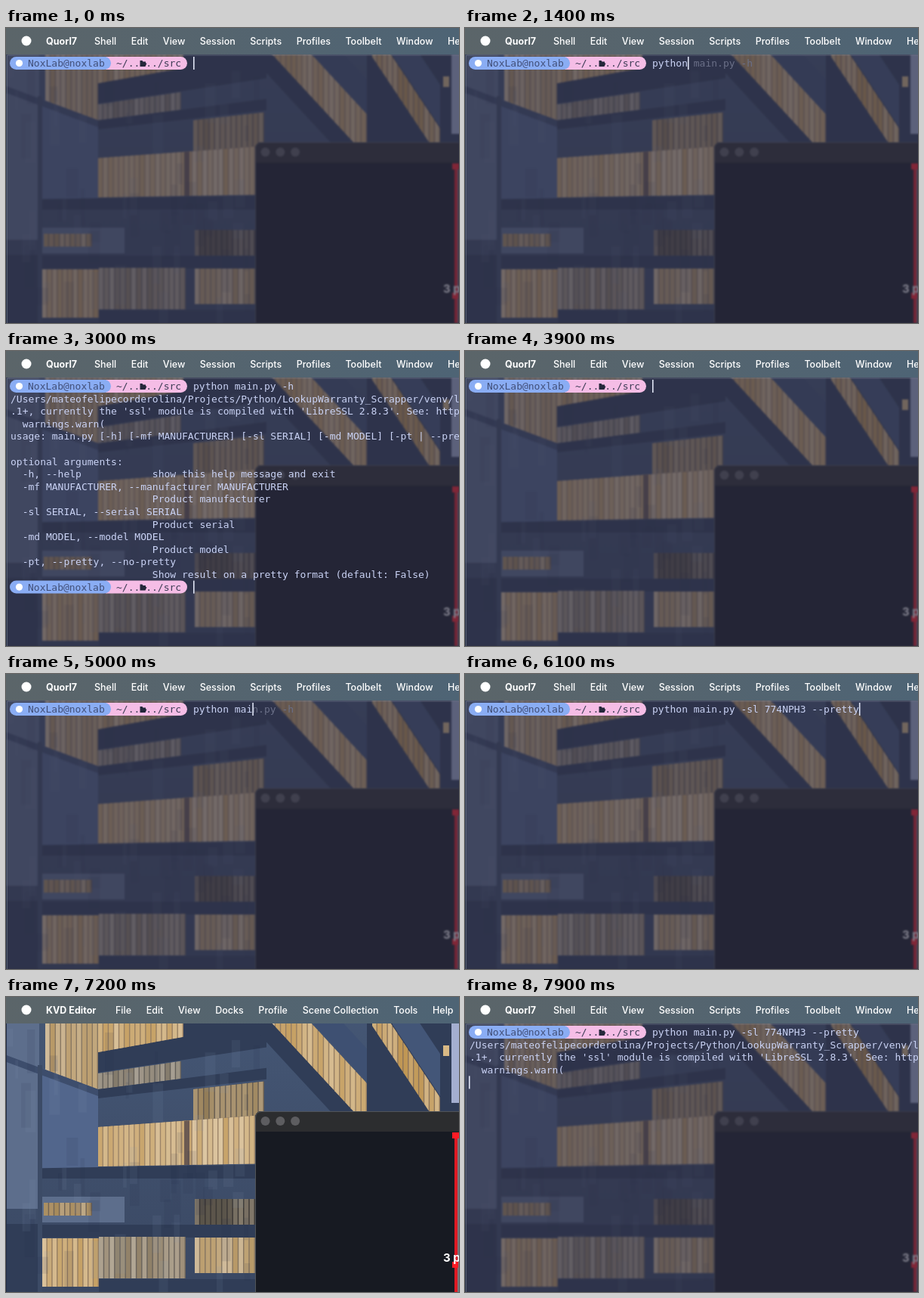
Write an HTML page that moves like this. It is 600 by 390 pixels and loops after 8000 ms.

```html
<!DOCTYPE html>
<html lang="en">
<head>
<meta charset="utf-8">
<title>Terminal session</title>
<style>
  html, body { margin: 0; width: 100%; height: 100%; overflow: hidden; background: #24273a; }
  svg { display: block; width: 100vw; height: 100vh; }
  text { white-space: pre; }
  .mono { font: 13px "DejaVu Sans Mono", monospace; fill: #cad3f5; }
  .menu { font: 500 12.5px Inter, "Open Sans", sans-serif; fill: #fff; }
  .app { font-weight: 700; }
  #painting { filter: blur(0.6px); }
</style>
</head>
<body>
<svg id="stage" viewBox="0 0 600 390" preserveAspectRatio="none">
  <defs>
    <linearGradient id="wall" x2="0" y2="1">
      <stop offset="0" stop-color="#455775"/><stop offset="1" stop-color="#3a4863"/>
    </linearGradient>
    <linearGradient id="bar"><stop offset="0" stop-color="#5b6569"/><stop offset="1" stop-color="#4e6475"/></linearGradient>
    <g id="prompt">
      <path d="M132-13H231.5a8.5 8.5 0 0 1 0 17H132z" fill="#f5bde6"/>
      <rect x="5" y="-13" width="134" height="17" rx="8.5" fill="#8aadf4"/>
      <circle cx="17.5" cy="-4.5" r="4.6" fill="#fff"/>
      <text class="mono" x="29" style="fill:#414f78">NoxLab@noxlab</text>
      <text class="mono" x="146" style="fill:#3d3c55">~/..</text>
      <path d="M177.5 0v-8h3l1 1.5h3.5v2h1.5l-2 4.5z" fill="#24273a"/>
      <text class="mono" x="185.2" style="fill:#3d3c55">../src</text>
    </g>
  </defs>
  <g id="desktop">
    <g id="painting"></g>
    <g id="window">
      <path d="M330 390V160q0-9 9-9H600V390z" fill="#171a22"/>
      <path d="M330 178V160q0-9 9-9H600V178z" fill="#2c2d2f"/>
      <path d="M330.5 390V160q0-8.5 8.5-8.5H600" fill="none" stroke="#505459"/>
      <path d="M599 187V390" stroke="#77737a" stroke-width="2"/>
      <path d="M596 180V390" stroke="#df1a24" stroke-width="4"/>
      <path d="M591 183h9M591 354h8" stroke="#ff1b25" stroke-width="8"/>
      <text x="579" y="350" fill="#fff" style="font:700 15px Inter,sans-serif">3 px</text>
    </g>
  </g>
  <g id="terminal">
    <rect x="1" y="35" width="599" height="355" fill="#2d2e43" opacity=".6"/>
    <path d="M1.5 390V36H600" fill="none" stroke="#7d8596" stroke-opacity=".55"/>
    <use href="#prompt" y="51"/>
    <use id="nextPrompt" href="#prompt"/>
    <g id="lines"></g>
    <text class="mono" x="248" y="51"><tspan id="typed"></tspan><tspan id="ghost" fill="#6b7088"></tspan></text>
    <rect id="cursor" width="1.6" height="17" fill="#dfe4f5"/>
  </g>
  <g id="termMenu"></g>
  <g id="recMenu"></g>
</svg>
<script>
const NS = "http://www.w3.org/2000/svg";
const $ = id => document.getElementById(id);
const LOOP = 8000, CHAR = 7.826, ROW = 16.6, BASE = 51, LEFT = 6, INPUT = 248;

function add(parent, tag, attrs, text = "") {
  const el = document.createElementNS(NS, tag);
  for (const key in attrs) el.setAttribute(key, attrs[key]);
  el.textContent = text;
  return parent.appendChild(el);
}

let seed = 7;
const random = () => (seed = seed * 16807 % 2147483647) / 2147483647;

// Each wing maps a height at its near corner to the height at x.
const HORIZON = 240, CORNER = 122;
const flat = (x, y) => y;
const front = (x, y) => y + Math.min(0, y - HORIZON) * (x - CORNER) * 0.00107;
const sloped = (origin, slope) => (x, y) => y + (x - origin) * slope;
const left = sloped(52, 0.37), right = sloped(350, 1.08), far = sloped(485, 1.5);

function panel(wing, x1, x2, top, bottom, fill, opacity = 1) {
  const points = [[x1, top], [x2, top], [x2, bottom], [x1, bottom]].map(([x, y]) => [x, wing(x, y)]);
  add($("painting"), "polygon", { points: points.join(" "), fill, opacity });
}

// A row of lit panes with uneven brightness and thin mullions.
function glazing(wing, x1, x2, top, bottom, light = 68, saturation = 46) {
  const step = (x2 - x1) / Math.max(2, Math.round((x2 - x1) / 7));
  panel(wing, x1, x2, top, bottom, `hsl(32,${saturation * 0.45}%,${light - 19}%)`);
  for (let x = x1; x < x2 - 1; x += step) {
    const tone = light + 6 - 16 * random();
    panel(wing, x, x + step * 0.8, top, bottom, `hsl(37,${saturation}%,${tone}%)`);
  }
}

function drawBuilding() {
  const shade = "#303d57", pale = "#5d6e8c";
  panel(flat, 0, 600, 0, 390, "url(#wall)");
  // left wing
  panel(flat, 0, 44, 30, 280, pale);
  panel(flat, 48, CORNER, 95, 236, "#52668c");
  glazing(left, 52, CORNER, 0, 96, 65, 36);
  panel(left, 0, CORNER, 96, 105, "#3d4d6c");
  panel(flat, 42, 48, 90, 390, "#3c4b66");
  panel(flat, 48, 157, 264, 298, pale);
  glazing(flat, 50, 114, 272, 289, 58, 30);
  panel(flat, 0, 42, 300, 390, shade);
  // front wing
  panel(front, CORNER, 345, 20, 100, shade);
  glazing(front, CORNER, 235, 20, 73);
  glazing(front, CORNER, 232, 101, 122, 56, 10);
  panel(front, CORNER, 345, 122, 134, shade);
  glazing(front, 248, 342, 136, 172, 55, 25);
  glazing(front, CORNER, 330, 172, 224, 70);
  panel(front, 236, 243, 172, 224, "#6b5a52");
  panel(front, 48, 330, 225, HORIZON, shade);
  glazing(front, 250, 330, 267, 310, 41, 10);
  panel(flat, 48, 330, 301, 318, shade);
  glazing(flat, 48, 123, 319, 383, 67);
  glazing(flat, 123, 238, 317, 372, 58, 16);
  glazing(flat, 250, 330, 318, 365, 65, 36);
  panel(flat, 123, 330, 373, 390, shade);
  // right wings
  panel(right, 270, 480, -20, 65, shade);
  glazing(right, 350, 478, -24, 32);
  panel(right, 400, 480, -70, -26, "#3e5072");
  panel(flat, 478, 600, 35, 152, shade);
  glazing(far, 485, 575, -2, 38, 64);
  panel(far, 512, 575, -60, -4, "#435678");
  panel(flat, 575, 590, 35, 152, shade);
  panel(flat, 579, 587, 64, 78, "#d8b985");
  panel(flat, 590, 602, 35, 140, "#a4afd0");
  // brush streaks
  for (let i = 0; i < 60; i++) {
    const x = 330 * random(), y = 40 + 320 * random();
    panel(flat, x, x + 3 + 12 * random(), y, y + 20 + 40 * random(), i % 2 ? "#8193b0" : "#222d45", 0.1);
  }
  panel(flat, 0, 1, 0, 390, "#202b43");
}

// Spreads the labels evenly between the first and the last start position.
function drawMenu(group, app, first, last, labels) {
  add(group, "rect", { width: 600, height: 35, fill: "url(#bar)" });
  add(group, "circle", { cx: 27, cy: 17, r: 6.5, fill: "#fff" });
  add(group, "text", { x: 53, y: 21.5, class: "menu app" }, app);
  const items = labels.split("|").map(label => add(group, "text", { y: 21.5, class: "menu" }, label));
  const widths = items.map(el => el.getComputedTextLength());
  const used = widths.slice(0, -1).reduce((sum, w) => sum + w, 0);
  const gap = (last - first - used) / (items.length - 1);
  let x = first;
  items.forEach((el, i) => {
    el.setAttribute("x", x);
    x += widths[i] + gap;
  });
}

drawBuilding();
for (let i = 0; i < 3; i++) add($("window"), "circle", { cx: 343.5 + 19.8 * i, cy: 164, r: 6, fill: "#5d5d60" });
drawMenu($("termMenu"), "Quorl7", 117, 585, "Shell|Edit|View|Session|Scripts|Profiles|Toolbelt|Window|Help");
drawMenu($("recMenu"), "KVD Editor", 145, 565, "File|Edit|View|Docks|Profile|Scene Collection|Tools|Help");

const warning = [
  "/Users/mateofelipecorderolina/Projects/Python/LookupWarranty_Scrapper/venv/lib",
  ".1+, currently the 'ssl' module is compiled with 'LibreSSL 2.8.3'. See: https",
  "  warnings.warn("
];
const column = " ".repeat(24);
const help = [
  "usage: main.py [-h] [-mf MANUFACTURER] [-sl SERIAL] [-md MODEL] [-pt | --pretty",
  "",
  "optional arguments:",
  "  -h, --help".padEnd(24) + "show this help message and exit",
  "  -mf MANUFACTURER, --manufacturer MANUFACTURER",
  column + "Product manufacturer",
  "  -sl SERIAL, --serial SERIAL",
  column + "Product serial",
  "  -md MODEL, --model MODEL",
  column + "Product model",
  "  -pt, --pretty, --no-pretty",
  column + "Show result on a pretty format (default: False)"
];
const rows = [...warning, ...help].map((line, i) =>
  add($("lines"), "text", { x: LEFT, y: BASE + ROW * (i + 1), class: "mono" }, line));

const CLEAR = 3600, RECORDER_OPEN = 7000, RECORDER_CLOSE = 7400, KEY = 85;
const helpCommand = "python main.py -h";
// After the typed part, the shell's suggestion is accepted as a whole.
const runs = [
  { text: helpCommand, part: "python", start: 900, accept: 1700, enter: 1950, warn: 2400, done: 2500 },
  { text: "python main.py -sl 774NPH3 --pretty", part: "python main.py -s", start: 4200, accept: 5700, enter: 6400, warn: 6700, done: Infinity }
];

function inputAt(run, t) {
  if (t < run.start) return ["", ""];
  if (t >= run.accept) return [run.text, ""];
  const typed = run.part.slice(0, Math.floor((t - run.start) / KEY) + 1);
  const suggestion = helpCommand.startsWith(typed) ? helpCommand : run.text;
  return [typed, suggestion.slice(typed.length)];
}

const show = (el, visible) => el.setAttribute("display", visible ? "inline" : "none");

function render(t) {
  const recording = t >= RECORDER_OPEN && t < RECORDER_CLOSE;
  show($("terminal"), !recording);
  show($("termMenu"), !recording);
  show($("recMenu"), recording);
  $("desktop").style.filter = recording ? "none" : "blur(0.8px)";

  const run = runs[t < CLEAR ? 0 : 1];
  const [typed, ghost] = inputAt(run, t);
  $("typed").textContent = typed;
  $("ghost").textContent = ghost;

  const done = t >= run.done, entered = t >= run.enter;
  const count = done ? rows.length : t >= run.warn ? warning.length : 0;
  rows.forEach((el, i) => show(el, i < count));
  show($("nextPrompt"), done);
  $("nextPrompt").setAttribute("y", BASE + ROW * (count + 1));

  $("cursor").setAttribute("x", done ? INPUT : entered ? LEFT - 1 : INPUT + typed.length * CHAR);
  $("cursor").setAttribute("y", BASE - 13 + (entered ? ROW * (count + 1) : 0));
}

const origin = performance.now();
function tick() {
  render((performance.now() - origin) % LOOP);
  requestAnimationFrame(tick);
}
tick();
</script>
</body>
</html>
```
